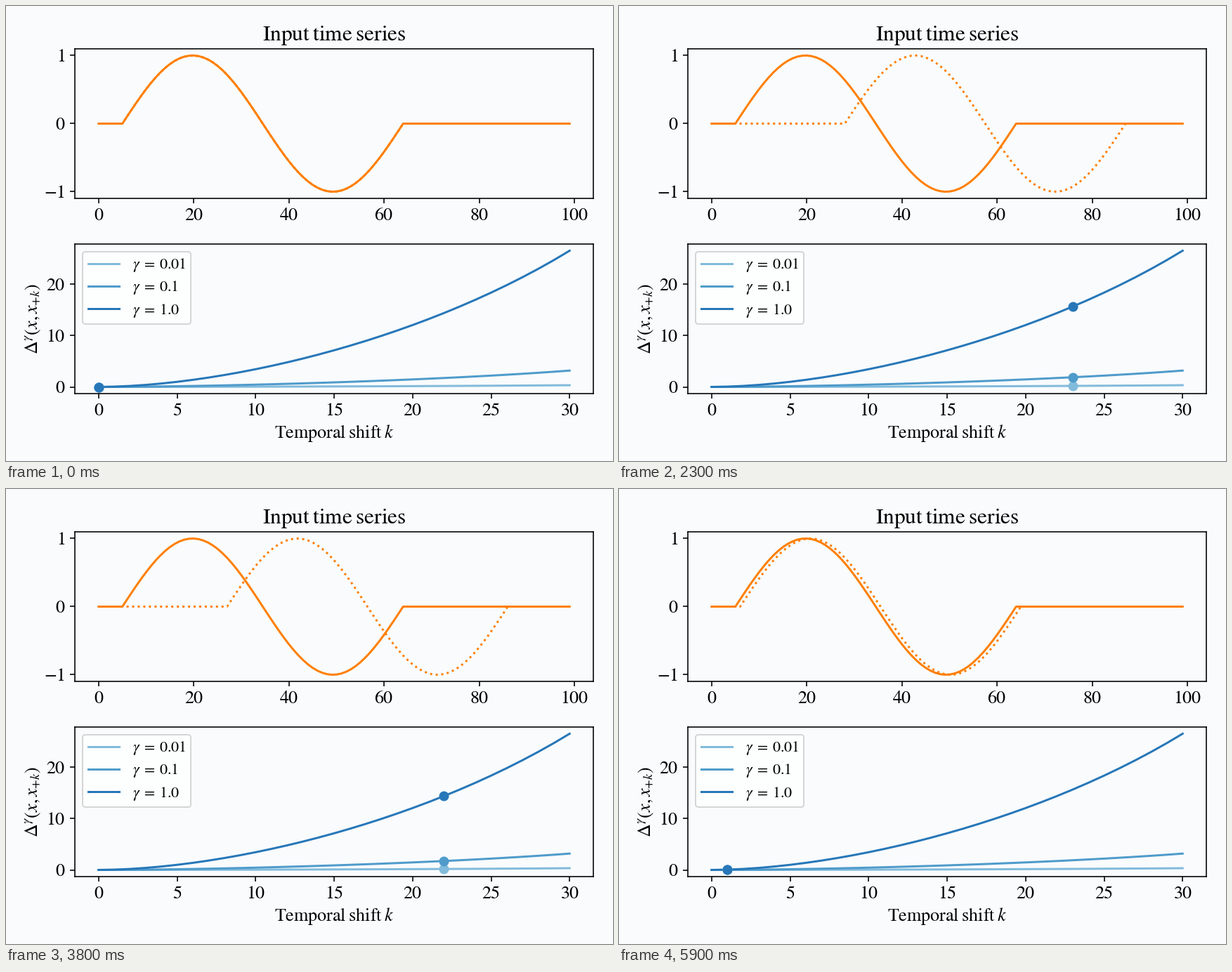
Animation of 864 by 648 pixels, one loop 6000 ms. Source, as a matplotlib script:

```python
import numpy as np
import matplotlib.pyplot as plt
from matplotlib.animation import FuncAnimation

W, H, DPI = 864, 648, 144
BG = "#f9fbfd"
ORANGE = "#ff7f00"
BLUES = ["#82bbdb", "#4f9bcb", "#2777b8"]
GAMMAS = [0.01, 0.1, 1.0]
N, MAX_SHIFT = 100, 30

plt.rcParams.update({
    "font.family": "Liberation Serif",
    "font.size": 13,
    "mathtext.fontset": "stix",
    "axes.facecolor": BG,
})


def soft_dtw_shifts(x, shifts, gammas):
    """Soft-DTW between x and each shifted copy, one row per gamma."""
    g = np.array(gammas)[:, None]
    shifted = np.array([np.roll(x, k) for k in shifts])
    cost = (x[:, None, None] - shifted.T[None]) ** 2
    # Scores are -R / gamma, so the soft minimum is a log-sum-exp.
    score = np.full((N + 1, N + 1, len(gammas), len(shifts)), -np.inf)
    score[0, 0] = 0
    for i in range(N):
        for j in range(N):
            best = np.logaddexp(score[i, j], score[i, j + 1])
            best = np.logaddexp(best, score[i + 1, j])
            score[i + 1, j + 1] = best - cost[i, j] / g
    return -g * score[N, N]


def add_axes(top, bottom, left=98.3, right=835.8):
    return fig.add_axes([left / W, 1 - bottom / H,
                         (right - left) / W, (bottom - top) / H])


def roman(text):
    """Upright math text with normal word spaces."""
    words = [rf"\mathrm{{{word}}}" for word in text.split()]
    return r"\hspace{0.25}".join(words)


def set_ticks(ax, xs, ys):
    ax.set_xticks(xs, [f"${x}$" for x in xs])
    ax.set_yticks(ys, [f"${y}$" for y in ys])


series = np.zeros(N)
series[5:65] = np.sin(np.linspace(0, 2 * np.pi, 60))
shifts = np.arange(MAX_SHIFT + 1)
values = soft_dtw_shifts(series, shifts, GAMMAS)
deltas = values - values[:, :1]

fig = plt.figure(figsize=(W / DPI, H / DPI), dpi=DPI, facecolor=BG)

ax_series = add_axes(60.8, 274.2)
ax_series.plot(series, color=ORANGE)
moved, = ax_series.plot(series, color=ORANGE, linestyle="dotted")
ax_series.set_title(f"${roman('Input time series')}$")
set_ticks(ax_series, range(0, 101, 20), [-1, 0, 1])
ax_series.set_xlim(-4.95, 103.95)
ax_series.set_ylim(-1.1, 1.1)

ax_delta = add_axes(338.8, 552.2)
for gamma, delta, color in zip(GAMMAS, deltas, BLUES):
    label = rf"$\gamma\hspace{{0.24}}=\hspace{{0.24}}{gamma}$"
    ax_delta.plot(shifts, delta, color=color, label=label)
dots = [ax_delta.plot([0], [0], "o", color=color)[0] for color in BLUES]
ax_delta.set_xlabel(rf"${roman('Temporal shift')}\hspace{{0.25}}k$",
                    labelpad=3.1)
ax_delta.set_ylabel(r"$\Delta^{\gamma}(x, x_{+k})$", labelpad=2.3)
set_ticks(ax_delta, range(0, 31, 5), [0, 10, 20])
ax_delta.set_xlim(-1.5, 31.5)
low, high = deltas.min(), deltas.max()
pad = 0.05 * (high - low)
ax_delta.set_ylim(low - pad, high + pad)
ax_delta.legend(loc="upper left", fontsize=11, facecolor="white",
                borderpad=0.34, labelspacing=0.37, handletextpad=0.86)


def update(frame):
    k = MAX_SHIFT - abs(MAX_SHIFT - frame)
    moved.set_ydata(np.roll(series, k))
    for dot, delta in zip(dots, deltas):
        dot.set_data([k], [delta[k]])
    return [moved, *dots]


anim = FuncAnimation(fig, update, frames=2 * MAX_SHIFT, interval=100,
                     repeat=True, repeat_delay=0)
plt.show()
```
